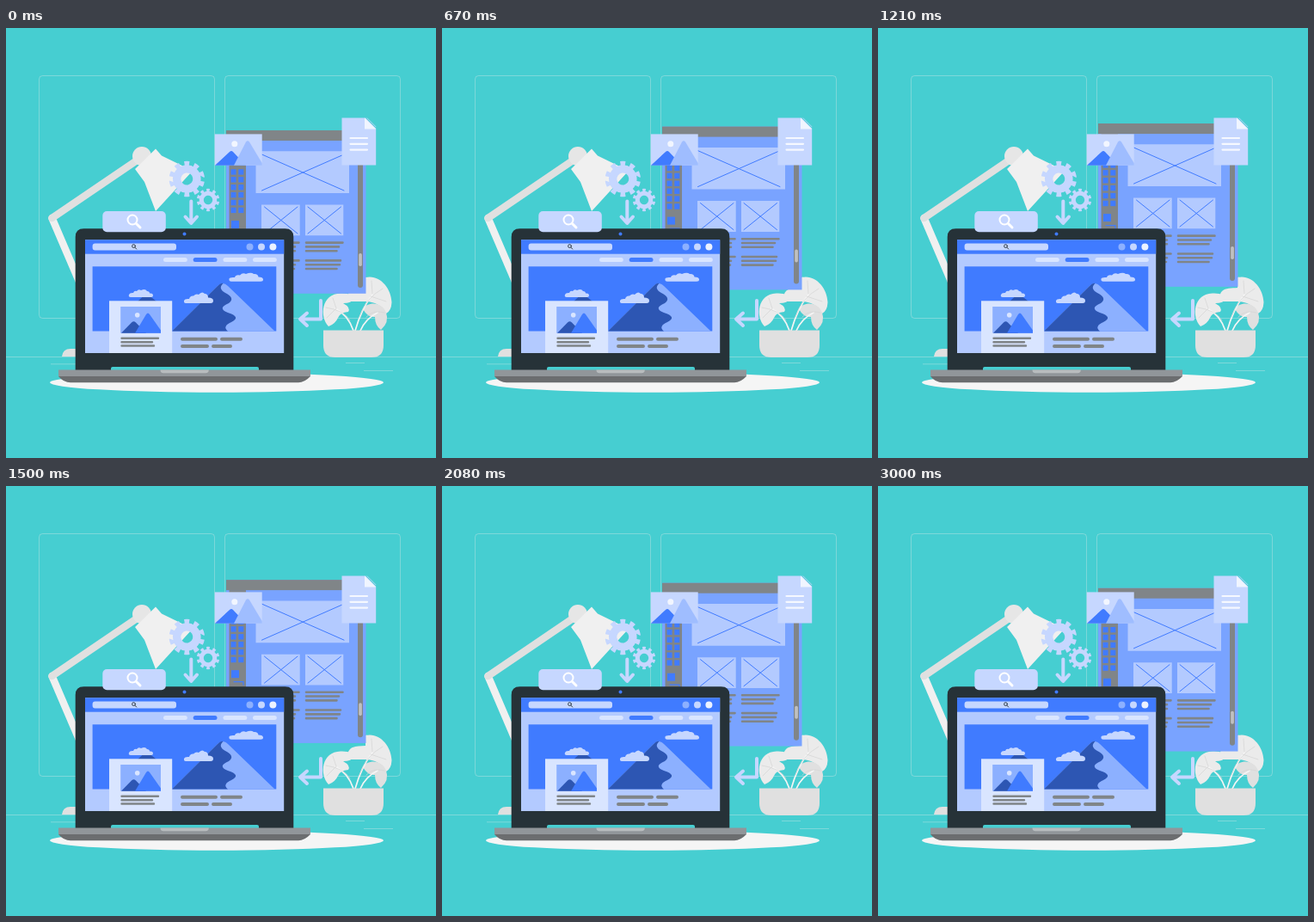
Write an HTML page that moves like this. It is 500 px wide and 500 px high and loops after 3.04 s.

```html
<!DOCTYPE html>
<html lang="en">
<head>
<meta charset="utf-8">
<title>Web design desk</title>
<style>
  html, body { margin: 0; width: 100%; height: 100%; overflow: hidden; background: #46ced1; }
  svg { display: block; width: 100vw; height: 100vh; }
  .line { fill: none; stroke-linecap: round; stroke-linejoin: round; }
  .blue { fill: #407bff; }
  .mid { fill: #79a3ff; }
  .soft { fill: #b3caff; }
  .pale { fill: #c6d7ff; }
  .mist { fill: #d9e5ff; }
  .grey { fill: #808588; }
</style>
</head>
<body>
<svg viewBox="0 0 500 500">
  <!-- room -->
  <g fill="none" stroke="#ebebeb" stroke-opacity=".42" stroke-width=".8">
    <rect x="38.5" y="55.5" width="204" height="282" rx="4"/>
    <rect x="254.5" y="55.5" width="204" height="282" rx="4"/>
    <path d="M0 382.5H500M395 389.5H417M416 398.5H450M52 390.8H82"/>
  </g>
  <ellipse cx="245" cy="412.3" rx="194" ry="11.4" fill="#f5f5f5"/>

  <!-- lamp -->
  <path d="M65 382Q66 373 75 373H90V382Z" fill="#e0e0e0"/>
  <path class="line" d="M53.5 221L95 318" stroke="#f0f0f0" stroke-width="8.5"/>
  <path class="line" d="M53.5 221L158 150" stroke="#e0e0e0" stroke-width="8.5"/>
  <circle cx="158" cy="149" r="11" fill="#e6e6e6"/>
  <path d="M150 164L174 140.5L181 148.5L217 166L174 213L161 179Z" fill="#f0f0f0"/>

  <!-- plant -->
  <path d="M397 318C396 301 407 303 418 302V290C434 286 448 302 448.500 319Q448 329 442 332Q434 318 418 318Z" fill="#ebebeb"/>
  <path d="M415 327C421 317 438 319 442 331Q446 342 436 351Q429 346 429 336Q421 337 415 327Z" fill="#e0e0e0"/>
  <path d="M375 347C364 335 367 309 389 308.500Q404 308 404.500 315Q402 320 392 320Q401 325 398 330Q388 331 386 337Q383 344 375 347Z" fill="#ebebeb"/>
  <g class="line" stroke="#f5f5f5" stroke-width="1.7">
    <path d="M404 352Q398 334 383 326M406 352Q413 327 426 310M412 352Q418 338 432 331"/>
  </g>
  <g class="line" stroke="#d4d4d4" stroke-width=".7">
    <path d="M400 340Q393 328 372 325M384 326L380 314M384 326L373 337M411 336Q418 314 438 303M426 309L425 294M424 312L442 318M419 336Q427 327 440 331"/>
  </g>
  <path d="M369 351.500H439V369Q439 383 425 383H383Q369 383 369 369Z" fill="#e0e0e0"/>

  <!-- floating wireframe -->
  <g id="panel">
    <rect class="mid" x="256" y="119" width="162.500" height="189.800"/>
    <rect class="grey" x="256" y="119" width="162.500" height="12"/>
    <rect class="grey" x="259.500" y="131" width="19.500" height="177"/>
    <rect class="grey" x="409" y="125" width="6" height="177" rx="3"/>
    <rect x="410.200" y="262" width="3.700" height="15" rx="1.800" fill="#c0c0c0"/>
    <g id="tools" class="blue">
      <rect x="262" y="224" width="9" height="9"/>
      <path class="line" d="M265 237.500H276V241" stroke="#407bff" stroke-width="1.200"/>
    </g>
    <path class="soft" d="M290.500 143.300H399V192H290.500ZM297 205.500H341.700V241.300H297ZM348 205.500H392.300V241.300H348Z"/>
    <path class="line" stroke="#407bff" stroke-width="1" d="M297.500 147L393 189M393 147L297.500 189M300.500 208L339 239M339 208L300.500 239M351 208L389.500 239M389.500 208L351 239"/>
    <path class="line" stroke="#808588" stroke-width="2.600" d="M299 249.600H340.500M349 249.600H391.500M299 254.400H336M349 254.400H387M299 259.200H336M349 259.200H384.500M299 270.400H340.500M349 270.400H389M299 275.200H336M349 275.200H388M299 280H335M349 280H384.500"/>
  </g>

  <!-- picture card -->
  <rect class="pale" x="242.800" y="123.400" width="54.900" height="36.300"/>
  <circle cx="265.800" cy="134.800" r="3.500" fill="#f2f6ff"/>
  <path class="blue" d="M243 159.700L260 144Q262 142 264 144L279 159.700Z"/>
  <path d="M265 159.700L279 132.500Q281 130 283 132.500L297.700 157V159.700Z" fill="#9fbdff"/>

  <!-- document -->
  <path class="pale" d="M390.500 104.400H418L430.200 116.800V159.500H390.500Z"/>
  <path d="M417 104.400L430.200 117.500H417Z" fill="#f0f5ff"/>
  <path class="line" d="M420 104.800L430 114.800" stroke="#c6d7ff" stroke-width=".8"/>
  <path class="line" stroke="#f5f8ff" stroke-width="2.200" d="M400.500 128H420M400.500 134.800H420M400.500 141.600H420"/>

  <!-- gears and arrows -->
  <g id="gears" fill="none" stroke="#c6d7ff"></g>
  <g class="line" stroke="#c6d7ff" stroke-width="4">
    <path d="M215.300 201.500V226M208.500 219.500L215.300 227L222 219.500"/>
    <path d="M366 317V338.500H343M350 331.500L342 338.500L350 346"/>
  </g>

  <!-- laptop -->
  <path d="M90.500 233.300H324.500Q334.300 233.300 334.300 243V398H80.700V243Q80.700 233.300 90.500 233.300Z" fill="#263238"/>
  <circle class="blue" cx="207.500" cy="239.600" r="2"/>
  <path d="M122 398V396Q122 394 124 394H292Q294 394 294 396V398Z" fill="#46ced1"/>
  <path d="M61 397.500H354V405H61Z" fill="#91969a"/>
  <path d="M61 405H354Q347 412.300 340 412.300H75Q67 412.300 61 405Z" fill="#6b6d6f"/>
  <path d="M179.500 397.500H235.800Q235.800 401.300 232 401.300H183Q179.500 401.300 179.500 397.500Z" fill="#b8bcbe"/>

  <!-- browser -->
  <rect class="soft" x="92" y="246.300" width="231.200" height="131.700"/>
  <rect class="blue" x="92" y="246.300" width="231.200" height="16.400"/>
  <rect class="pale" x="100.600" y="250.400" width="97.400" height="8.200" rx="3"/>
  <g class="line" stroke="#263238" stroke-width=".9">
    <circle cx="148.500" cy="253.600" r="1.900"/><path d="M150 255.200L151.700 257"/>
  </g>
  <circle cx="283.500" cy="254.500" r="4" fill="#8cb0ff"/>
  <circle cx="297" cy="254.500" r="4" class="pale"/>
  <circle cx="310.400" cy="254.500" r="4" fill="#ecf2ff"/>
  <g id="tabs"></g>

  <rect class="blue" x="100.600" y="277.300" width="213.700" height="75.200"/>
  <path d="M193 352.500L246 300Q252 294 258 300L312.500 352.500Z" fill="#8cb0ff"/>
  <path d="M193 352.500L246 300Q250 296 252.500 297Q246 303 255 308Q267 314 259 320Q245 326 258 331Q274 336 262 342Q251 347 258 352.500Z" fill="#2d56b3"/>
  <path d="M140 330L160 311.500Q163.500 309 167 311.500L180 322V330Z" fill="#2d56b3"/>
  <g class="pale">
    <path d="M145 313Q142 313 143 310Q144 307.500 148 308Q149 305 152 306Q154 303 157 305Q162 302.500 164 306Q167 306 167 308.500Q171 308 171 311Q171 313 169 313Z"/>
    <path d="M209 320Q206.500 320 207 317Q208 314.500 213 315Q214 311 218 311.500Q221 308.500 224 310Q228 305.500 231 309Q235 309 235 313.500Q241 313.500 241 317Q241 320 238 320Z"/>
    <path d="M262 294.700Q259 294.700 259.500 291.500Q260 289.500 266 290Q267 286.500 272 287.500Q275 284 279 286Q285 283.500 288 286Q293 285.500 293.500 289.500Q299 289.500 299 292.500Q299 294.700 296 294.700Z"/>
  </g>

  <rect class="mist" x="120" y="317.300" width="73.200" height="60.700"/>
  <rect x="133.200" y="324" width="46.800" height="30.800" fill="#8cb0ff"/>
  <circle cx="152.700" cy="333.800" r="2.800" fill="#d9e5ff"/>
  <path d="M134 354.800L146 342.500Q148.500 340 151 342.500L163 354.800Z" fill="#2d56b3"/>
  <path class="blue" d="M150 354.800L163 333Q165 330 167 333L180 351.500V354.800Z"/>
  <g class="line" stroke="#808588">
    <path stroke-width="2.400" d="M134.500 360.800H177M134.500 365.200H170M134.500 369.500H172"/>
    <path stroke-width="4" d="M205 361.700H244M251 361.700H273M205 370.100H234M241 370.100H261"/>
  </g>

  <!-- search badge -->
  <rect class="pale" x="112.300" y="213" width="73.500" height="24.200" rx="5"/>
  <g class="line" stroke="#fff">
    <circle cx="147" cy="223" r="5.500" stroke-width="2"/>
    <path d="M151.500 227.500L156 232" stroke-width="3"/>
  </g>
</svg>
<script>
  const el = id => document.getElementById(id);
  const add = (id, markup) => el(id).insertAdjacentHTML('beforeend', markup);

  // body ring plus ten teeth cut from a dashed ring
  function gear(x, y, hole, body, tip) {
    const ring = (a, b, extra = '') =>
      `<circle r="${(a + b) / 2}" stroke-width="${b - a}" ${extra}/>`;
    add('gears', `<g transform="translate(${x} ${y}) rotate(-99)">` +
      ring(hole, body) +
      ring(body - 1, tip, 'pathLength="20" stroke-dasharray="1 1"') + '</g>');
  }
  gear(210.3, 175.5, 7, 16.3, 20.7);
  gear(235, 200, 5.2, 10.3, 13.2);

  for (let row = 0; row < 6; row++)
    for (const x of [261.5, 270.3])
      add('tools', `<rect x="${x}" y="${164.2 + row * 8.9}" width="6" height="6.4"/>`);

  [183, 217.7, 252.5, 287].forEach((x, i) =>
    add('tabs', `<rect class="${i === 1 ? 'blue' : 'mist'}" x="${x}" y="267" width="27.800" height="5" rx="2.500"/>`));

  const LOOP = 3040, RISE = 10;
  function draw(now) {
    const p = now % LOOP / LOOP;
    const lift = RISE * (1 - Math.abs(1 - 2 * p));
    el('panel').setAttribute('transform', `translate(0 ${-lift})`);
    requestAnimationFrame(draw);
  }
  draw(performance.now());
</script>
</body>
</html>
```
